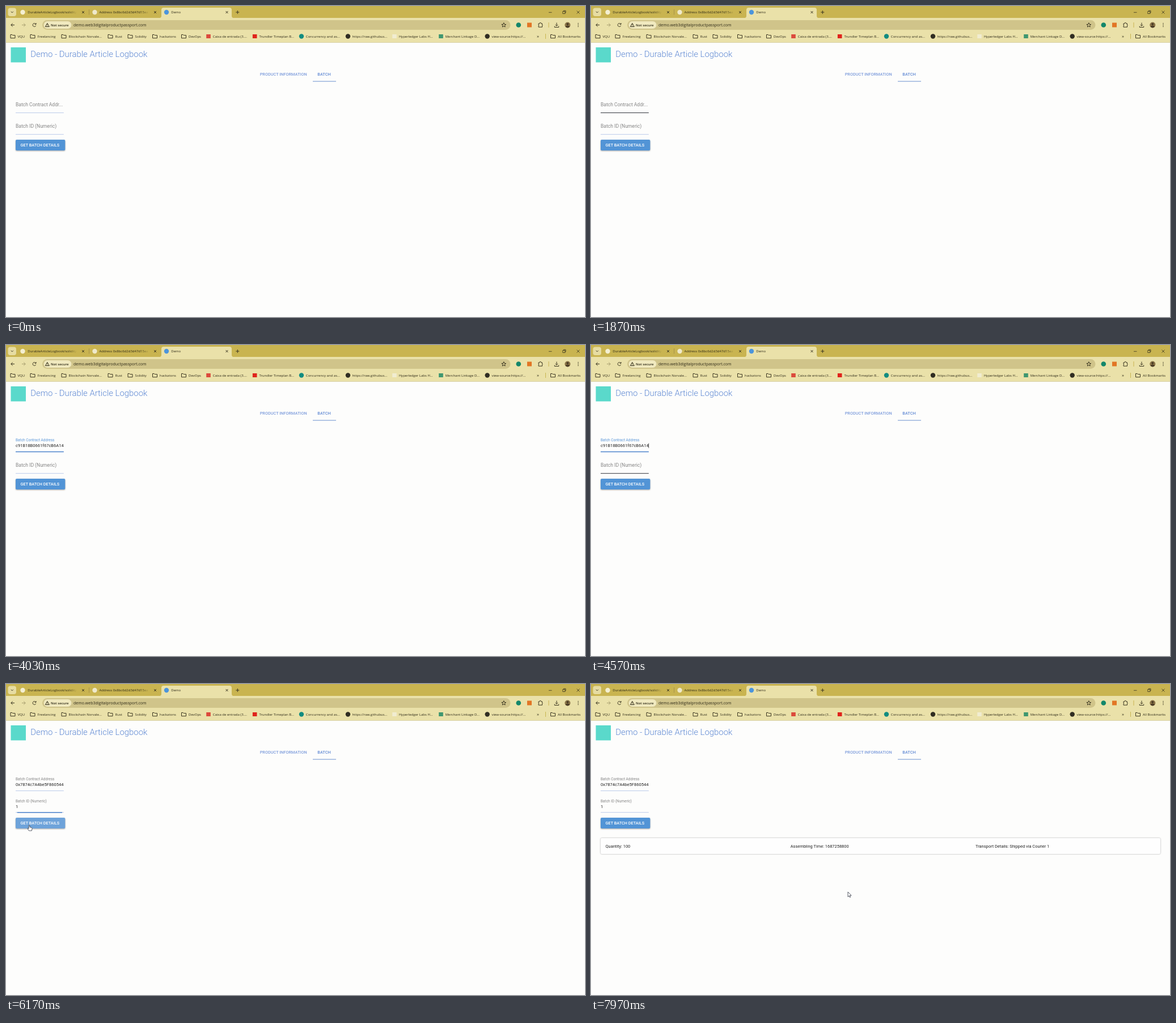
An HTML page that plays this animation: 1021x549 px, repeating every 8 s.

```html
<!DOCTYPE html>
<html lang="en">
<head>
<meta charset="utf-8">
<title>Demo</title>
<style>
  html, body { margin: 0; width: 100%; height: 100%; overflow: hidden; background: #fdfdfc; }
  svg { display: block; width: 1021px; height: 549px; }
  .ui { font: 6px "Open Sans", "Noto Sans", sans-serif; fill: #2e2a18; }
  .page { font: 7.45px Roboto, sans-serif; fill: #222; }
  .caps { font-size: 7.3px; font-weight: 500; }
  .icon { fill: none; stroke: #3a3520; stroke-width: 1; }
  #btn { filter: drop-shadow(0 1px 1px rgba(0, 0, 0, .35)); }
  #card rect { filter: drop-shadow(0 .8px .9px rgba(0, 0, 0, .38)); }
</style>
</head>
<body>
<svg viewBox="0 0 1021 549" xmlns="http://www.w3.org/2000/svg">
  <defs>
    <linearGradient id="fade" x1="0" x2="1">
      <stop offset="0" stop-color="#c9b450" stop-opacity="0"/>
      <stop offset="1" stop-color="#c9b450"/>
    </linearGradient>
    <clipPath id="clip1"><rect x="16" y="160" width="86.5" height="30"/></clipPath>
  </defs>

  <rect width="1021" height="549" fill="#fdfdfc"/>
  <g class="ui">
    <rect width="1021" height="22" fill="#c9b450"/>
    <rect y="21" width="1021" height="43.5" fill="#eae1a9"/>
    <path d="M0 64.5H1021" stroke="#d3cca0" stroke-width=".8"/>
    <path d="M270 21.5q4-.5 4-4V7q0-4 4-4H394q4 0 4 4V17.500q0 3.500 4 4z" fill="#eae1a9"/>
    <rect x="3.500" y="3.500" width="14.500" height="14.500" rx="4" fill="#e6dca2"/>
    <g id="tabs"></g>
    <g class="icon">
      <path d="M8.800 9.800L10.800 11.800L12.800 9.800M405.300 11H411.300M408.300 8V14"/>
      <path d="M146.500 6V15.500" stroke="#a8954a"/>
      <path d="M957 11.300H962.500M981.800 9.500H985.800V13.500H981.800zM983.300 9.500V8.200H987V12H985.800M1006.500 8.500L1011.500 13.500M1011.500 8.500L1006.500 13.500" stroke-width=".8"/>
      <path d="M15 33.500H9M11.800 30.500L8.800 33.500L11.800 36.500"/>
      <path d="M28 33.500H34M31.200 30.500L34.200 33.500L31.200 36.500" stroke="#a89f70"/>
      <path d="M52.500 32A2.900 2.900 0 1 0 52.700 34.600M53 30V32.300H50.700"/>
    </g>
    <rect x="64" y="25" width="825.500" height="17" rx="8.500" fill="#d0c48a"/>
    <rect x="66.500" y="27" width="49" height="13" rx="6.500" fill="#f0e9bf"/>
    <path class="icon" d="M72.800 30.300L76.300 36.500H69.300zM72.800 32.500V34.300M72.800 35V35.700" stroke-width=".8"/>
    <text x="79" y="35.700" font-weight="600">Not secure</text>
    <text x="119" y="36" font-size="7">demo.web3digitalproductpassport.com</text>
    <path class="icon" d="M877.800 29.600L878.900 32.300L881.700 32.500L879.500 34.300L880.200 37L877.800 35.500L875.400 37L876.100 34.300L873.900 32.500L876.700 32.300z" stroke-width=".8"/>
    <circle cx="903.800" cy="33.500" r="4.300" fill="#14876a"/>
    <rect x="919" y="29.500" width="8" height="8" fill="#e27625"/>
    <path class="icon" d="M939 31H941V30Q942.300 28.700 943.600 30V31H945.500V33Q947 33.700 945.500 35V37.200H939V35Q940.500 34 939 33z"/>
    <path d="M957 29V38" stroke="#c9b450"/>
    <path class="icon" d="M971 29.500V35M968.700 33L971 35.300L973.300 33M967.300 35.500V37.500H974.700V35.500"/>
    <circle cx="990.300" cy="33.500" r="5" fill="#8a7447"/>
    <path d="M986.300 36.500Q990.300 32.500 994.300 36.500Q990.300 40.500 986.300 36.500z" fill="#4b3c26"/>
    <circle cx="990.300" cy="32" r="1.900" fill="#4b3c26"/>
    <g fill="#3a3520"><circle cx="1009" cy="30.700" r=".8"/><circle cx="1009" cy="33.500" r=".8"/><circle cx="1009" cy="36.300" r=".8"/></g>
    <g id="marks"></g>
    <text x="936" y="55.500" font-size="8">»</text>
    <path d="M951.500 49V58" stroke="#c9b450"/>
  </g>

  <g class="page">
    <rect x="8.500" y="73" width="26.500" height="26.500" fill="#5ad9cb"/>
    <text x="43.300" y="89.700" font-size="14.900" font-weight="300" fill="#5d88d3">Demo - Durable Article Logbook</text>
    <g class="caps">
      <text x="447.700" y="123" fill="#7d9cdc">PRODUCT INFORMATION</text>
      <text x="549.300" y="123" fill="#6089d4">BATCH</text>
    </g>
    <path d="M541 133H582" stroke="#6a8fd0" stroke-width="1.200"/>
    <g id="fields"></g>
    <g id="btn">
      <rect x="17" y="236" width="87.300" height="19" rx="2"/>
      <text class="caps" x="25.500" y="247.600" fill="#fff">GET BATCH DETAILS</text>
    </g>
    <g id="card">
      <rect x="17" y="272" width="987" height="28" rx="2" fill="#fefefe"/>
      <text x="25.500" y="288.500">Quantity: 100</text>
      <text x="351.700" y="288.500">Assembling Time: 1687258800</text>
      <text x="678" y="288.500">Transport Details: Shipped via Courier 1</text>
    </g>
  </g>

  <g stroke="#333844" stroke-width=".8" stroke-linejoin="round" fill="#fff">
    <path id="arrow" d="M0 0V8.700L2 6.900L3.300 9.700L4.700 9.100L3.400 6.300H6.100z"/>
    <path id="hand" d="M-.9.600Q0-.5.900.600V3.600L4.200 4.500Q5.300 5 5 6.500L4.300 10H-.6L-3 6.600Q-3.300 5.300-2 5.600L-.9 6.500z"/>
  </g>
</svg>
<script>
const $ = id => document.getElementById(id);
const set = (el, attrs) => { for (const k in attrs) el.setAttribute(k, attrs[k]); };
const show = (el, on) => el.style.display = on ? '' : 'none';
const text = (x, y, s) => `<text x="${x}" y="${y}">${s}</text>`;
const dot = (x, y, c) => `<circle cx="${x}" cy="${y}" r="4.200" fill="${c}"/>`;
const box = (x, y, c) => `<rect x="${x - 3.8}" y="${y - 3.5}" width="7.600" height="7" fill="${c}"/>`;
const folder = x => `<path class="icon" stroke-width=".8" d="M${x} 50.500h2.800l1 1.200h4.200v5h-8z"/>`;

// Browser chrome
const tabs = [
  [29.5, 38.3, 'DurableArticleLogbook/solidity', '#f4efd2', 136],
  [156.5, 164.5, 'Address 0x8bc6d2d3d47d15ea', '#efe9cb', 263],
  [283, 291.3, 'Demo', '#4c95dc', 389.5]
];
$('tabs').innerHTML = tabs.map(([ix, tx, s, c, cx], i) =>
  dot(ix, 11, c) + text(tx, 13.2, s) +
  (i < 2 ? `<rect x="${cx - 25}" y="5" width="14" height="13" fill="url(#fade)"/>
            <rect x="${cx - 11}" y="5" width="16" height="13" fill="#c9b450"/>` : '') +
  `<path class="icon" d="M${cx - 2} 9l4 4m0-4l-4 4"/>`).join('');

const folders = [
  [8, 'VQU'], [43, 'Freelancing'], [98, 'Blockchain Norvale...'], [180, 'Rust'],
  [215, 'Solidity'], [258.5, 'hackatons'], [309.5, 'DevOps'], [960.5, 'All Bookmarks']
];
const links = [
  [357, 'Caixa de entrada (3....', box, '#dc4a3c'],
  [438.7, 'Trundler Timeplan B...', box, '#e0241c'],
  [521, 'Concurrency and as...', dot, '#128c80'],
  [603, 'https://raw.githubus...', dot, '#302d22'],
  [685, 'Hyperledger Labs H...', box, '#f1ecd0'],
  [767, 'Merchant Linkage D...', box, '#3f9770'],
  [848.7, 'view-source:https://...', dot, '#302d22']
];
$('marks').innerHTML =
  folders.map(([x, s]) => folder(x) + text(x + 12.6, 55.6, s)).join('') +
  links.map(([x, s, shape, c]) => shape(x, 53.5, c) + text(x + 7.7, 55.6, s)).join('');

// Form fields: y is the underline
const fields = [
  { y: 188.5, full: 'Batch Contract Address', short: 'Batch Contract Addr...',
    focus: 2400, input: 3500, blur: 4700, value: 'c91B18B0661f67cB6A14',
    rest: '0x7874c7A4be5F860544', caretX: 101.8 },
  { y: 226.7, full: 'Batch ID (Numeric)', short: 'Batch ID (Numeric)',
    focus: 4700, input: 5150, blur: 6140, value: '1', rest: '1', caretX: 21.6 }
];
$('fields').innerHTML = fields.map((f, i) => `
  <g ${i ? '' : 'clip-path="url(#clip1)"'}>
    <text id="label${i}" font-size="8.550"></text>
    <text id="value${i}" x="17" y="${f.y - 8.2}" font-size="7.550"></text>
    <path id="caret${i}" d="M0 ${f.y - 15}v8.500" stroke="#222" stroke-width=".8"/>
  </g>
  <path id="line${i}" d="M17 ${f.y}H101.800" stroke-width="1"/>
  <path id="ink${i}" stroke="#4b82cc" stroke-width="1.500"/>`).join('');

const clamp = v => Math.min(1, Math.max(0, v));
const smooth = v => (v = clamp(v), v * v * (3 - 2 * v));
const ramp = (t, from, ms) => smooth((t - from) / ms);
const mix = (a, b, p) => a + (b - a) * p;

// Pointer stops: time, x, y
const path = [
  [720, 1020, 356], [1420, 72, 180], [4350, 72, 182], [4650, 60, 216],
  [5720, 60, 216], [5980, 41, 249], [7400, 41, 249], [7820, 453, 367], [8000, 453, 367]
];
function pointer(t) {
  if (t < path[0][0]) return null;
  const i = path.findIndex(p => p[0] > t);
  const [t0, x0, y0] = path[i - 1], [t1, x1, y1] = path[i];
  const p = ramp(t, t0, t1 - t0);
  return { x: mix(x0, x1, p), y: mix(y0, y1, p) };
}
const over = (p, y0, y1) => !!p && p.x > 17 && p.x < 104 && p.y > y0 && p.y < y1;

function drawField(f, i, t, mouse) {
  const active = t >= f.focus && t < f.blur;
  const up = ramp(t, f.focus, 200);
  const hover = over(mouse, f.y - 24, f.y + 1.5);
  const label = $('label' + i);
  label.textContent = up > 0 ? f.full : f.short;
  set(label, {
    transform: `translate(17 ${mix(f.y - 11.7, f.y - 18.2, up)}) scale(${mix(1, .76, up)})`,
    fill: active ? '#5b97d8' : '#858585'
  });
  $('value' + i).textContent = t < f.input ? '' : t < f.blur ? f.value : f.rest;

  const typed = t >= f.input;
  const blink = (t - (typed ? f.input : f.focus)) % 1060 < 530;
  show($('caret' + i), active && blink);
  set($('caret' + i), { transform: `translate(${typed ? f.caretX : 17.5} 0)` });

  set($('line' + i), { stroke: hover && !active ? '#30343c' : '#bccbea' });
  const half = 42.4 * (t < f.blur ? ramp(t, f.focus, 200) : 1 - ramp(t, f.blur, 200));
  show($('ink' + i), half > 0);
  set($('ink' + i), { d: `M${59.4 - half} ${f.y}H${59.4 + half}` });
}

function draw(t) {
  const mouse = pointer(t);
  const onButton = over(mouse, 236, 255);
  const onField = fields.some(f => over(mouse, f.y - 24, f.y + 1.5));
  fields.forEach((f, i) => drawField(f, i, t, mouse));
  set($('btn').firstElementChild, { fill: onButton ? '#6ea3da' : '#5294d6' });
  show($('card'), t >= 6550);
  show($('arrow'), mouse && !onButton && !onField);
  show($('hand'), onButton);
  if (mouse) for (const id of ['arrow', 'hand']) set($(id), { transform: `translate(${mouse.x} ${mouse.y})` });
}

function frame() {
  draw(performance.now() % 8000);
  requestAnimationFrame(frame);
}
frame();
</script>
</body>
</html>
```
